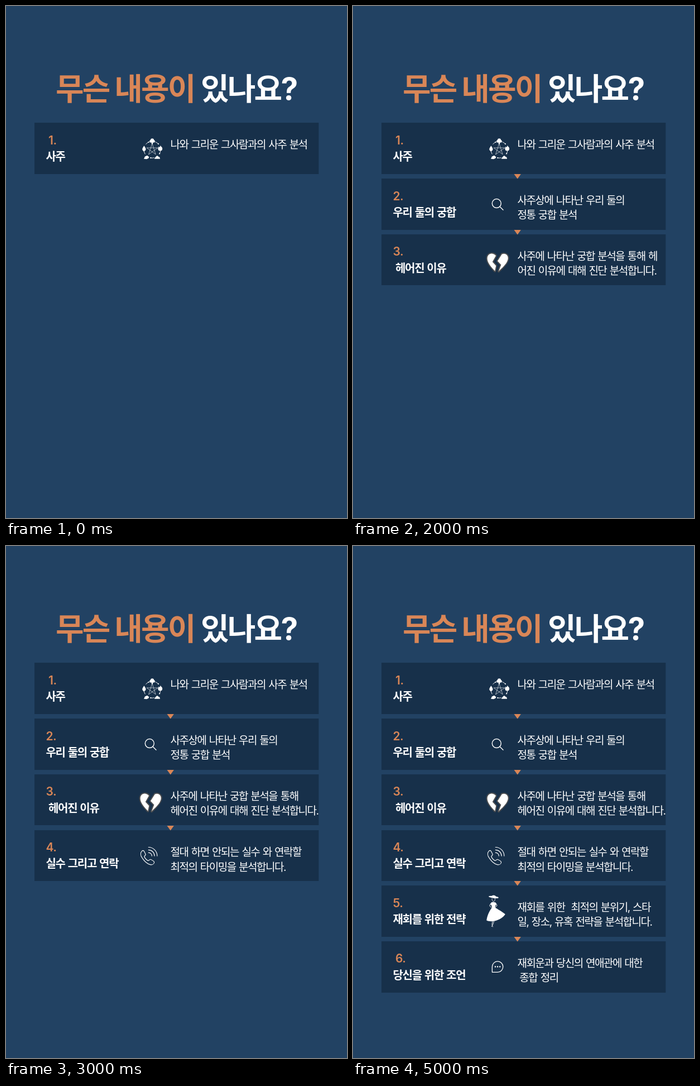
Recreate the animation shown at these times as an HTML page with a canvas. Size 611 by 917 pixels, loop 6000 ms.

```html
<!DOCTYPE html>
<html lang="ko">
<head>
<meta charset="utf-8">
<style>
html, body { margin: 0; width: 100%; height: 100%; overflow: hidden; background: #224263; }
canvas { display: block; width: 611px; height: 917px; }
</style>
</head>
<body>
<canvas id="stage"></canvas>
<script>
const W = 611, H = 917, STEP = 1000;
const BG = '#224263', PANEL = '#17304a', ORANGE = '#d98657', WHITE = '#fff', GREY = '#4b4d50';
const FONT = 'Inter, "Noto Sans CJK KR", "Noto Sans CJK", sans-serif';
const TOP = 209.45, PITCH = 99.7, PANEL_H = 91.6;

const STYLES = {
  title: { font: `700 55px ${FONT}`, track: -2.8, word: -0.7 },
  label: { font: `600 20px ${FONT}`, track: -1.3, word: 1.3 },
  body: { font: `400 19px ${FONT}`, track: -1.5, word: 1.5 },
  number: { font: `600 21px ${FONT}`, track: -0.5, word: 0 }
};

const ROWS = [
  { label: '사주', numX: 76, lines: ['나와 그리운 그사람과의 사주 분석'], icon: elements },
  { label: '우리 둘의 궁합', lines: ['사주상에 나타난 우리 둘의', '정통 궁합 분석'], icon: magnifier },
  { label: '헤어진 이유', labelX: 76, lines: ['사주에 나타난 궁합 분석을 통해', '헤어진 이유에 대해 진단 분석합니다.'],
    firstLines: ['사주에 나타난 궁합 분석을 통해 헤', '어진 이유에 대해 진단 분석합니다.'], icon: brokenHeart },
  { label: '실수 그리고 연락', drop: 1, lines: ['절대 하면 안되는 실수 와 연락할', '최적의 타이밍을 분석합니다.'], icon: phone },
  { label: '재회를 위한 전략', lines: ['재회를 위한  최적의 분위기, 스타', '일, 장소, 유혹 전략을 분석합니다.'], icon: lady },
  { label: '당신을 위한 조언', numX: 76, lines: ['재회운과 당신의 연애관에 대한', ' 종합 정리'], icon: bubble }
];

const canvas = document.getElementById('stage');
const ctx = canvas.getContext('2d');
const ratio = window.devicePixelRatio || 1;
canvas.width = W * ratio;
canvas.height = H * ratio;

function write(text, x, y, style, color = WHITE) {
  const s = STYLES[style];
  ctx.font = s.font;
  ctx.letterSpacing = s.track + 'px';
  ctx.wordSpacing = s.word + 'px';
  ctx.fillStyle = color;
  ctx.fillText(text, x, y);
}

function fill(d, color = WHITE) {
  ctx.fillStyle = color;
  ctx.fill(new Path2D(d));
}

function stroke(d, width, color = WHITE) {
  ctx.strokeStyle = color;
  ctx.lineWidth = width;
  ctx.stroke(new Path2D(d));
}

function oval(x, y, rx, ry, turn = 0) {
  ctx.fillStyle = WHITE;
  ctx.beginPath();
  ctx.ellipse(x, y, rx, ry, turn, 0, Math.PI * 2);
  ctx.fill();
}

function arc(x, y, r, from, to, width) {
  ctx.strokeStyle = WHITE;
  ctx.lineWidth = width;
  ctx.beginPath();
  ctx.arc(x, y, r, from, to);
  ctx.stroke();
}

// Icons are drawn relative to x = 238 and their panel's top edge.
function elements() {
  const cx = 24, cy = 48, r = 15;
  const angle = k => -Math.PI / 2 + k * Math.PI * 0.4;
  const point = k => [cx + 10.5 * Math.cos(angle(k)), cy + 10.5 * Math.sin(angle(k))];
  stroke('M' + [0, 2, 4, 1, 3].map(k => point(k).join()).join('L') + 'Z', 0.6);
  for (let k = 0; k < 5; k++) {
    arc(cx, cy, r, angle(k) + 0.4, angle(k + 1) - 0.4, 0.9);
    const a = angle(k + 1) - 0.45;
    oval(cx + r * Math.cos(a), cy + r * Math.sin(a), 1.1, 1.1);
  }
  oval(24, 30.7, 3, 2.7);
  oval(22, 33, 2.8, 2.5);
  oval(26, 33, 2.8, 2.5);
  fill('M23.3 33h1.4l.6 5h-2.6Z');
  fill('M39 40c0 3 3.2 3 3.2 6.2a3.9 3.9 0 0 1-7.8 0c0-2 1-2.2 1.4-3.6l1.2 1.2c1-1 1.5-2.2 2-3.8Z');
  fill('M9.5 41c1.8 3 3 4.2 3 6.3a3.1 3.1 0 0 1-6.2 0c0-2.1 1.4-3.5 3.2-6.3Z');
  fill('M9 64.5l2-4.2 4-1.8 3.3 2.4-1 2.6-3.3 1.5Z');
  fill('M28 64.5c0-2 2-2.5 3-4.5 2-1.8 3-1 4 .5 2 .3 3 2 3 4Z');
}

function magnifier() {
  arc(19.3, 44.6, 8, 0, Math.PI * 2, 1.4);
  stroke('M25 50.3L31 56.2', 1.4);
}

function brokenHeart() {
  const halves = [
    'M18 38.5C13 33 5 34 2.8 41C1 50 10 59 16.3 66L18.2 56.5L11.8 49.5Z',
    'M28.8 35.8C36 33 41 39 39.6 45C37.5 54 28 61 23 66.5L27.4 54.8L21 48.2Z'
  ];
  for (const half of halves) stroke(half, 4, GREY);
  for (const half of halves) fill(half);
}

function phone() {
  stroke('M5.5 38C2.5 41 2.5 46 6.5 51C10.5 57 15.5 61 20.5 62.3C23.5 63 26.5 61.5 27.5 59C28 57.5 27.5 57 26.5 56L22 53.3C20.5 52.5 19.5 53 18.5 54.3C17.5 55.6 16.5 55.5 15 54.4C13.1 53 11.7 51.4 10.5 49.5C9.5 48 9.8 47.1 11 46.2C12.2 45.4 12.5 44.3 11.8 43L9.3 38.2C8.3 36.6 6.9 36.7 5.5 38Z', 1.1);
  for (const r of [6, 10.8, 15.6]) arc(17.3, 46.8, r, -Math.PI / 2, 0, 1.1);
}

function lady() {
  oval(14, 20.8, 9, 1.8, 0.12);
  fill('M10 20.5C10 16.5 17.5 16.5 18.3 20.5Z');
  stroke('M11 23.5C11 27 12.5 28.5 14.2 28.5C16 28 16.6 26 16.5 23.5', 0.8);
  fill('M9.5 30.5L13 29.5L17.5 30.5L19 33L17 37L16.5 40H11L10.3 36L8.5 34Z');
  stroke('M8.5 32.5L6.8 36.5L10 39.5', 1);
  stroke('M18.5 32.5L20 36L16.8 39.5', 1);
  fill('M11 39.5H16.8C21 42.5 28 46 34.8 51.5C31.5 57 24 62 15 63.7C9 64.6 4 64 1.3 62.5C2.5 54 6 46 11 39.5Z');
  stroke('M12 64L11 70L12.4 74M14.5 64L13 69L10.5 73.5', 0.9);
}

function bubble() {
  stroke('M11.4 55.6V46A9.7 9.7 0 1 1 21.1 55.6Z', 1.3);
  for (const x of [17, 21.1, 25.2]) oval(x, 45.8, 1.2, 1.2);
}

function drawRow(i, shown) {
  const row = ROWS[i];
  const y = TOP + PITCH * i, top = Math.round(y), bottom = Math.round(y + PANEL_H);
  ctx.fillStyle = PANEL;
  ctx.fillRect(51, top, 509.3, bottom - top);
  if (i > 0) fill(`M288.5 ${top - 8}H300.9L294.7 ${top + 0.4}Z`, ORANGE);

  write(`${i + 1}.`, row.numX || 71.5, y + 38.5, 'number', ORANGE);
  write(row.label, row.labelX || 71.5, y + 67.8, 'label');
  const lines = row.firstLines && shown === i + 1 ? row.firstLines : row.lines;
  lines.forEach((line, n) => write(line, 294.5, y + 45.8 + (row.drop || 0) + 26.2 * n, 'body'));

  ctx.save();
  ctx.translate(238, y - 0.2);
  row.icon();
  ctx.restore();
}

function draw(now) {
  const shown = Math.floor(now / STEP) % ROWS.length + 1;
  ctx.setTransform(ratio, 0, 0, ratio, 0, 0);
  ctx.lineCap = ctx.lineJoin = 'round';
  ctx.fillStyle = BG;
  ctx.fillRect(0, 0, W, H);
  write('무슨 내용이', 89, 168, 'title', ORANGE);
  write('있나요?', 349, 168, 'title');
  for (let i = 0; i < shown; i++) drawRow(i, shown);
}

let start;
function tick(now) {
  start ??= now;
  draw(now - start);
  requestAnimationFrame(tick);
}
draw(0);
requestAnimationFrame(tick);
</script>
</body>
</html>
```
